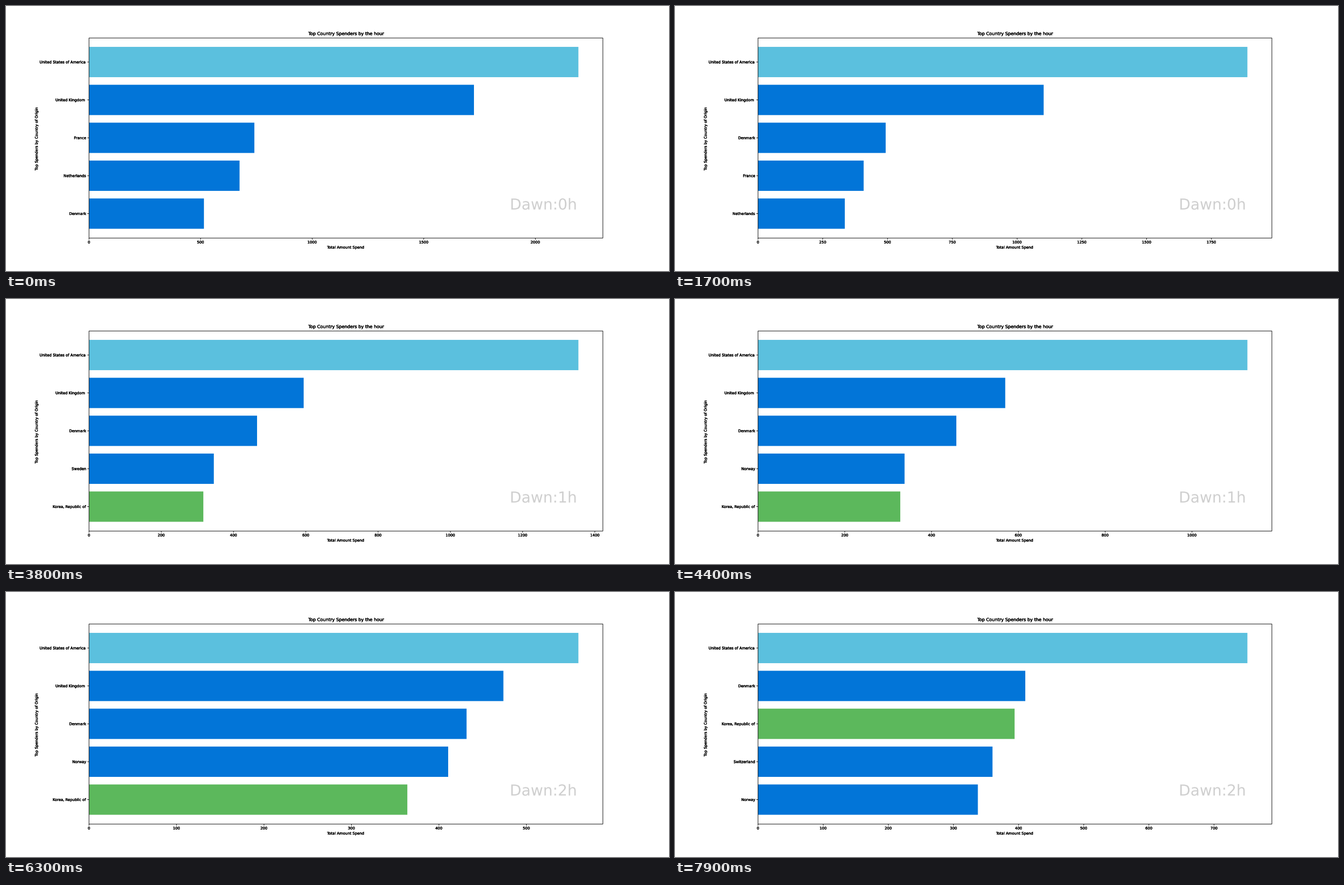
Write a matplotlib script that moves like this. It is 1183x473 px and loops after 8 s.

```python
import numpy as np
import matplotlib.pyplot as plt
from matplotlib.animation import FuncAnimation
from matplotlib.patches import Rectangle
from matplotlib.patheffects import Normal, withStroke
from matplotlib.ticker import MaxNLocator

W, H, DPI = 1183, 473, 64
FRAMES, INTERVAL, STEPS = 80, 100, 30

# Plot area and bar layout in pixels, y pointing down
LEFT, RIGHT, TOP, BOTTOM = 148.1, 1065.0, 57.1, 414.2
FIRST, PITCH, BAR = 100.0, 67.64, 54.1
SMALL, TITLE, HUGE = 6.57, 7.89, 27.0

LIGHT, BLUE, GREEN = "#5bc0de", "#0275d8", "#5cb85c"
COLORS = {"United States of America": LIGHT, "Korea, Republic of": GREEN}

# Amount spent at each full hour; linear in between
SPEND = {
    "United States of America": (2193, 1656.5, 523.5, 883),
    "United Kingdom": (1725, 626.5, 504.9, 193),
    "France": (741, 153, 90, 60),
    "Netherlands": (674.6, 75.3, 60, 80),
    "Denmark": (515, 475.8, 435.6, 395.6),
    "Sweden": (0, 471, 0, 0),
    "Norway": (412, 262, 424.3, 287.2),
    "Korea, Republic of": (0, 301.2, 358.3, 414.4),
    "Switzerland": (0, 0, 280, 406.2),
}


def pt(px):
    return px * 72 / DPI


plt.rcParams["font.family"] = "DejaVu Sans"
fig = plt.figure(figsize=(W / DPI, H / DPI), dpi=DPI, facecolor="white")
ax = fig.add_axes([0, 0, 1, 1])
ax.set_xlim(0, W)
ax.set_ylim(H, 0)
ax.axis("off")


def label(x, y, text="", size=SMALL, ha="center", color="black", heavy=0.35, **kw):
    effects = [withStroke(linewidth=pt(heavy), foreground=color) if heavy else Normal()]
    return ax.text(x, y, text, fontsize=pt(size), ha=ha, va="baseline",
                   color=color, path_effects=effects, **kw)


def line(xs, ys):
    return ax.plot(xs, ys, color="black", lw=pt(0.9), snap=False,
                   solid_capstyle="butt", zorder=3)[0]


mid_x, mid_y = (LEFT + RIGHT) / 2, (TOP + BOTTOM) / 2
label(mid_x, 52, "Top Country Spenders by the hour", TITLE)
label(mid_x, 433, "Total Amount Spend")
label(56.6, mid_y + 0.5, "Top Spenders by Country of Origin",
      rotation=90, rotation_mode="anchor")
clock = label(1018.9, 363.3, size=HUGE, ha="right", color="#cfcfcf", heavy=0)

ax.add_patch(Rectangle((LEFT, TOP), RIGHT - LEFT, BOTTOM - TOP, fill=False,
                       ec="black", lw=pt(0.9), snap=False, zorder=3))

bars, names = [], []
for i in range(5):
    y = FIRST + i * PITCH
    bars.append(ax.add_patch(Rectangle((LEFT, y - BAR / 2), 0, BAR, lw=0, snap=False)))
    names.append(label(143.4, y + 2.4, ha="right"))
    line([LEFT - 2.9, LEFT], [y, y])

ticks = [(line([0, 0], [BOTTOM, BOTTOM + 2.9]), label(0, 423.8)) for _ in range(12)]
locator = MaxNLocator(nbins=9, steps=[1, 2, 2.5, 5, 10])


def draw(frame):
    hour = frame / STEPS
    totals = {name: np.interp(hour, range(4), row) for name, row in SPEND.items()}
    ranking = sorted(totals, key=totals.get, reverse=True)[:5]
    limit = totals[ranking[0]] * 1.05
    scale = (RIGHT - LEFT) / limit

    for name, bar, text in zip(ranking, bars, names):
        bar.set_width(totals[name] * scale)
        bar.set_facecolor(COLORS.get(name, BLUE))
        text.set_text(name)
        text.set_x(141.8 if name == "United Kingdom" else 143.4)

    values = [v for v in locator.tick_values(0, limit) if 0 <= v <= limit]
    for i, (mark, text) in enumerate(ticks):
        shown = i < len(values)
        mark.set_visible(shown)
        text.set_visible(shown)
        if shown:
            x = LEFT + values[i] * scale
            mark.set_xdata([x, x])
            text.set_x(x)
            text.set_text(f"{values[i]:.0f}")

    clock.set_text(f"Dawn:{frame // STEPS}h")
    return []


anim = FuncAnimation(fig, draw, frames=FRAMES, interval=INTERVAL,
                     repeat=True, repeat_delay=0, blit=False)
plt.show()
```
